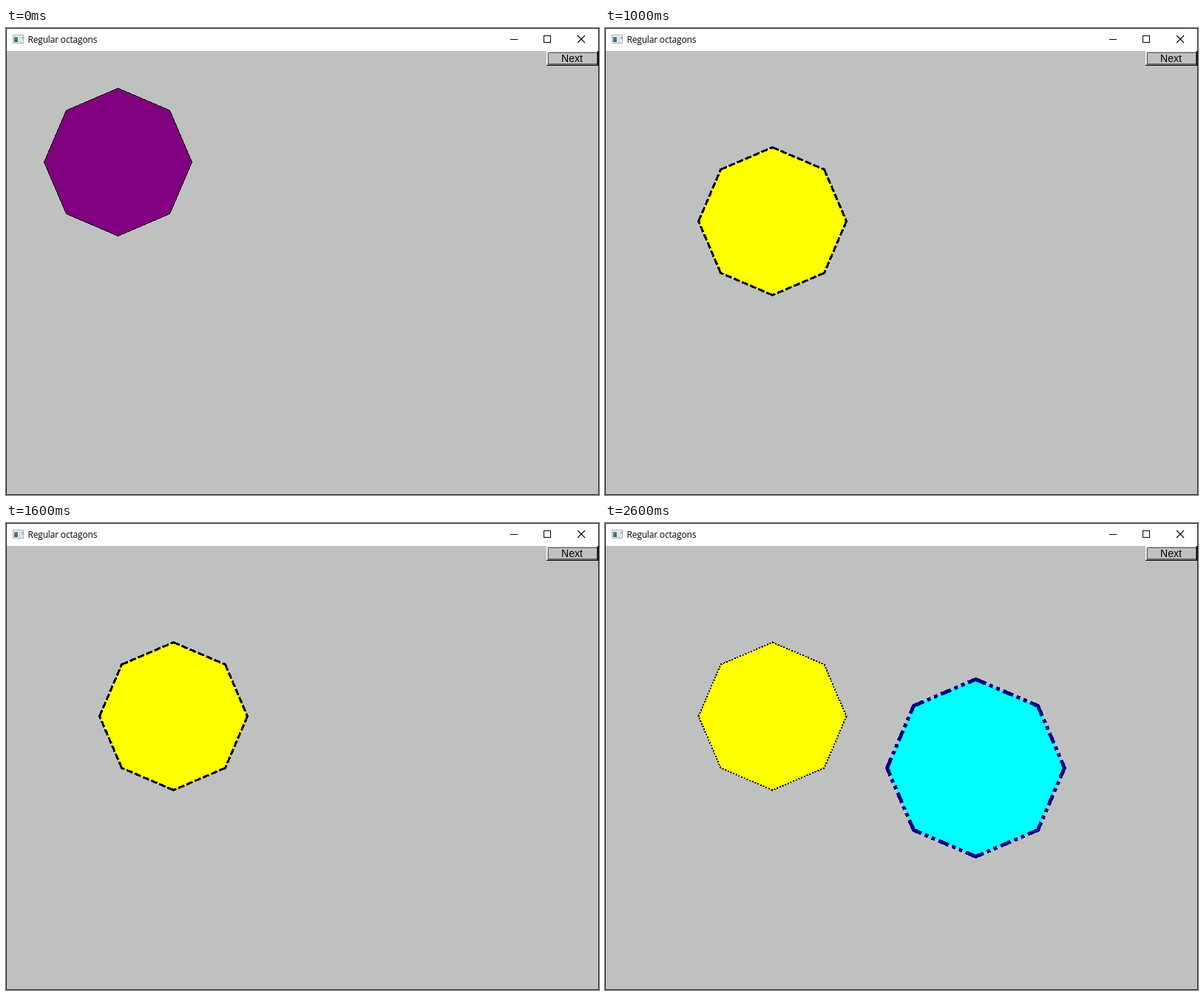
Recreate the animation shown at these times as an HTML page. Size 802 by 632 pixels, loop 3 s.

```html
<!DOCTYPE html>
<html lang="en">
<head>
<meta charset="utf-8">
<title>Regular octagons</title>
<style>
  html, body { margin: 0; width: 100%; height: 100%; overflow: hidden; }
  svg { display: block; }
  .title { font: 12px "Open Sans", sans-serif; letter-spacing: -.18px; }
  .label { font: 14px "Liberation Sans", Arial, sans-serif; text-anchor: middle; }
  .crisp { shape-rendering: crispEdges; }
  .line { fill: none; stroke: #000; }
</style>
</head>
<body>
<svg width="802" height="632" viewBox="0 0 802 632">
  <defs>
    <linearGradient id="pane" x2="0" y2="1">
      <stop stop-color="#5b8a9c"/>
      <stop offset="1" stop-color="#2f5f5f"/>
    </linearGradient>
  </defs>

  <!-- Window -->
  <g class="crisp">
    <rect width="802" height="632" fill="#1c252b"/>
    <rect x="1" y="1" width="800" height="30" fill="#fff"/>
    <rect x="1" y="31" width="800" height="600" fill="#bfc1c0"/>
    <rect x="9.5" y="9.5" width="14" height="11" fill="#f0f2f3" stroke="#a9afb3"/>
    <rect x="11" y="12" width="5" height="7" fill="url(#pane)"/>
    <rect x="17" y="11" width="4" height="9" fill="#dde1e5"/>
    <rect x="21" y="12" width="2" height="3" fill="#a8b4c2"/>
    <path class="line" d="M682 15.5h10M727.5 10.5h9v9h-9z"/>
  </g>
  <path class="line" d="M773 10l10 10M783 10l-10 10" stroke-width="1.1"/>
  <text class="title" x="29.5" y="20">Regular octagons</text>

  <!-- Button -->
  <g class="crisp">
    <path class="line" d="M731.5 50V31.5H800" style="stroke:#fff"/>
    <path class="line" d="M732 49.5H799.5V32" style="stroke:#808080"/>
    <path class="line" d="M731 50.5H800.5V31"/>
    <rect class="line" x="733.5" y="33.5" width="66" height="15" stroke-dasharray="1 1"/>
  </g>
  <text class="label" x="765.5" y="46">Next</text>

  <g id="shapes" class="crisp"></g>
</svg>
<script>
const shapes = document.getElementById("shapes");

// Dash patterns restart at every corner; the first dash wraps around it.
function octagon(cx, cy, radius, fill, stroke, width, pattern) {
  const diagonal = Math.floor(radius * Math.SQRT1_2);
  const edge = Math.hypot(diagonal, radius - diagonal);
  const points = [];
  for (let i = 0; i < 10; i++) {
    const reach = i % 2 ? diagonal : radius;
    const angle = i * Math.PI / 4;
    points.push([cx + reach * Math.sign(Math.round(2 * Math.sin(angle))),
                 cy - reach * Math.sign(Math.round(2 * Math.cos(angle)))]);
  }
  let dash = "";
  if (pattern) {
    const runs = [];
    let length = 0;
    for (let i = 0; length < edge; i++) {
      const run = Math.min(pattern[i % pattern.length] * width, edge - length);
      runs.push(run);
      length += run;
    }
    let wrap = 0;
    if (runs.length % 2) {
      wrap = runs.pop();
      runs[0] += wrap;
    }
    dash = `stroke-dasharray="${runs.join(" ")}" stroke-dashoffset="${wrap}"`;
  }
  return `<polyline points="${points.join(" ")}" fill="${fill}" stroke="${stroke}" stroke-width="${width}" ${dash}/>`;
}

const yellow = (width, pattern) =>
  octagon(226.5, 261.5, 100, "#ff0", "#000", width, pattern);

const scenes = [
  octagon(151.5, 181.5, 100, "#800080", "#000", 1),
  yellow(3, [3, 1]),
  yellow(2, [1, 1]) +
    octagon(501.5, 331.5, 120, "#0ff", "#000080", 5, [3, 1, 1, 1, 1, 1])
];

let shown = -1;
function draw() {
  const scene = Math.floor(performance.now() / 1000) % scenes.length;
  if (scene !== shown) shapes.innerHTML = scenes[shown = scene];
  requestAnimationFrame(draw);
}
draw();
</script>
</body>
</html>
```
